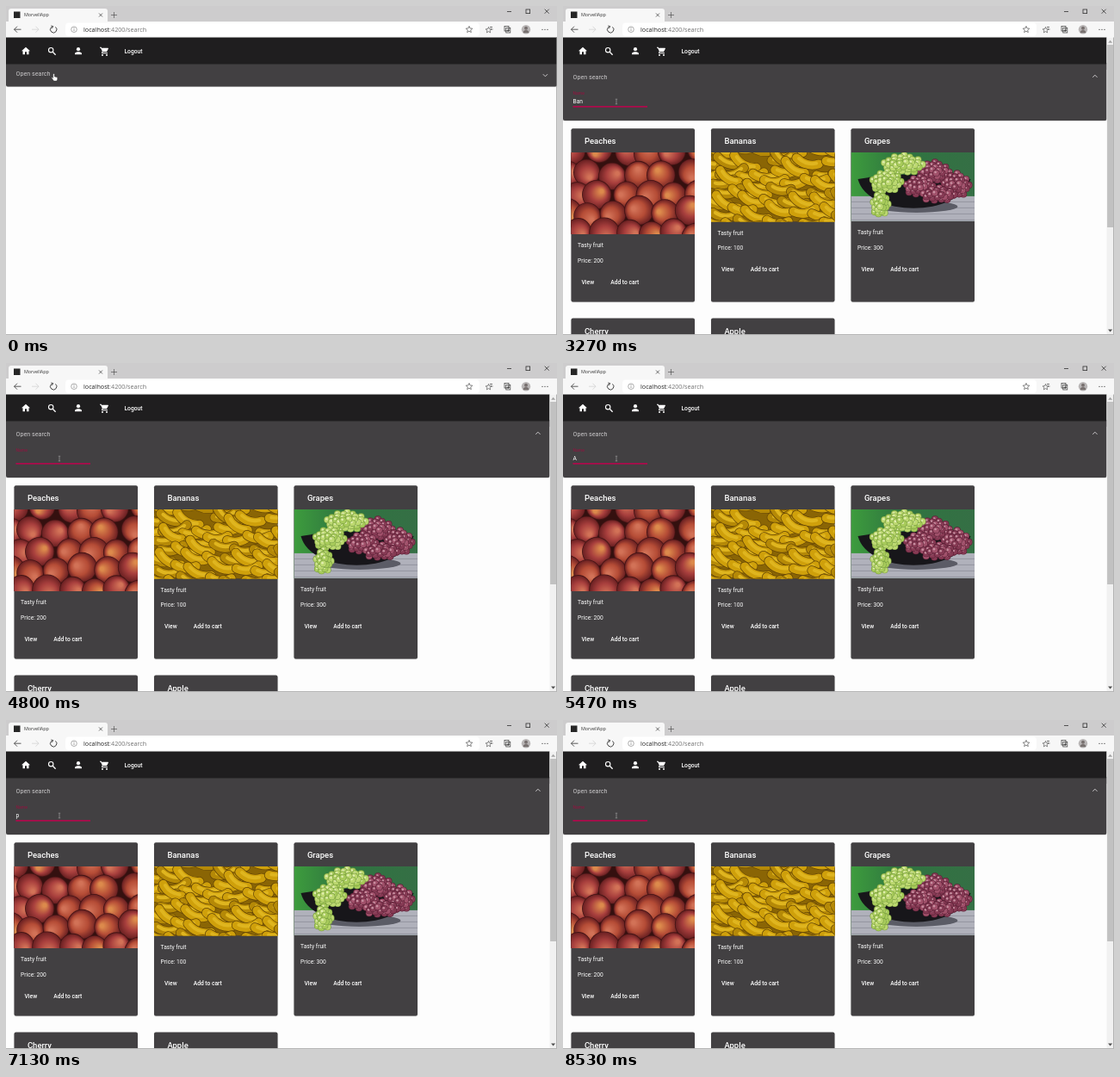
Write an HTML page with a canvas that moves like this. It is 640x382 px and loops after 8.59 s.

```html
<!DOCTYPE html>
<html lang="en">
<head>
<meta charset="utf-8">
<title>Fruit search</title>
<style>
  html, body { margin: 0; width: 100%; height: 100%; overflow: hidden; background: #fdfdfd; }
  canvas { display: block; width: 640px; height: 382px; }
</style>
</head>
<body>
<canvas id="stage"></canvas>
<script>
const W = 640, H = 382, LOOP = 8590, TICK = 66.6;
const PINK = '#b4004e', PANEL = '#424042', BAR = '#1f1e1f', WHITE = '#fff';
const UI = '"Open Sans", "Noto Sans", sans-serif';
const APP = 'Roboto, Arial, sans-serif';

const canvas = document.getElementById('stage');
const g = canvas.getContext('2d');
const dpr = window.devicePixelRatio || 1;
canvas.width = W * dpr;
canvas.height = H * dpr;

// Each entry holds from its time until the next one.
const typed = [[0, ''], [2600, 'B'], [2800, 'Ba'], [3000, 'Ban'], [4530, 'Ba'], [4600, 'B'],
  [4670, ''], [4930, 'A'], [6670, ''], [7000, 'p'], [8270, '']];
const views = [[0, 'none'], [1670, 'all'], [3790, 'spin'], [4270, 'Bananas'], [4670, 'all'],
  [5600, 'spin'], [6000, 'Apple'], [6670, 'all'], [7670, 'spin'], [8000, 'Peaches'], [8270, 'all']];
const OPEN = 400, MOVE = 670, ARRIVE = 1130, FOCUS = 1470;

const fruits = [
  { name: 'Peaches', price: 200, h: 95, photo: peaches },
  { name: 'Bananas', price: 100, h: 80.5, photo: bananas },
  { name: 'Grapes', price: 300, h: 80, photo: grapes },
  { name: 'Cherry', price: 200, h: 80, photo: apples },
  { name: 'Apple', price: 100, h: 72, photo: apples }
];

const at = (list, t) => list.filter(e => e[0] <= t).pop();
const clamp = x => Math.max(0, Math.min(1, x));
const mix = (a, b, k) => a + (b - a) * k;
const smooth = x => x * x * (3 - 2 * x);

function random(seed) {
  return () => (seed = (seed * 16807) % 2147483647) / 2147483647;
}

function rect(x, y, w, h, color) {
  g.fillStyle = color;
  g.fillRect(x, y, w, h);
}

function round(x, y, w, h, r, color) {
  g.fillStyle = color;
  g.beginPath();
  g.roundRect(x, y, w, h, r);
  g.fill();
}

function raised(x, y, w, h) {
  g.save();
  g.shadowColor = 'rgba(0,0,0,.25)';
  g.shadowBlur = dpr;
  g.shadowOffsetY = 0.4 * dpr;
  round(x, y, w, h, 2, PANEL);
  g.restore();
}

function oval(x, y, rx, ry, color) {
  g.fillStyle = color;
  g.beginPath();
  g.ellipse(x, y, rx, ry, 0, 0, 7);
  g.fill();
}

const dot = (x, y, r, color) => oval(x, y, r, r, color);

function line(points, color, width = 0.8) {
  g.strokeStyle = color;
  g.lineWidth = width;
  g.beginPath();
  points.forEach(([x, y], i) => i ? g.lineTo(x, y) : g.moveTo(x, y));
  g.stroke();
}

function ring(x, y, r, color, width = 0.8, from = 0, to = Math.PI * 2) {
  g.strokeStyle = color;
  g.lineWidth = width;
  g.beginPath();
  g.arc(x, y, r, from, to);
  g.stroke();
}

function text(s, x, y, size, color, weight = 400, family = APP) {
  g.font = `${weight} ${size}px ${family}`;
  g.fillStyle = color;
  g.fillText(s, x, y);
}

function path(d, x, y, scale, color) {
  g.save();
  g.translate(x, y);
  g.scale(scale, scale);
  g.fillStyle = color;
  g.fill(new Path2D(d));
  g.restore();
}

function star(x, y, r) {
  const pts = Array.from({ length: 11 }, (_, i) => {
    const a = i * Math.PI / 5 - Math.PI / 2, q = i % 2 ? r * 0.45 : r;
    return [x + q * Math.cos(a), y + q * Math.sin(a)];
  });
  line(pts, '#555', 0.7);
}

function browser() {
  const ink = '#333';
  rect(0, 0, W, 18, '#cdcccd');
  round(3, 3, 115, 18, [3, 3, 0, 0], '#f7f7f7');
  rect(0, 18, W, 18.5, '#f7f7f7');
  rect(9, 6.5, 7.5, 7.5, '#262626');
  text('MorvellApp', 21, 12.3, 5.4, ink, 400, UI);
  line([[108, 8.5], [112, 12.5]], ink, 0.7);
  line([[112, 8.5], [108, 12.5]], ink, 0.7);
  line([[122, 10.5], [129, 10.5]], '#555', 0.7);
  line([[125.5, 7], [125.5, 14]], '#555', 0.7);
  line([[582, 6.5], [587, 6.5]], ink);
  g.strokeRect(604, 4, 4.6, 4.6);
  line([[625.7, 3.7], [630.7, 8.7]], ink);
  line([[630.7, 3.7], [625.7, 8.7]], ink);

  line([[17.5, 27.2], [9.5, 27.2]], ink);
  line([[13, 23.7], [9.5, 27.2], [13, 30.7]], ink);
  line([[30, 27.2], [38, 27.2]], '#d3d3d3');
  line([[34.5, 23.7], [38, 27.2], [34.5, 30.7]], '#d3d3d3');
  ring(55.2, 27.3, 3.7, ink, 0.9, -0.9, 4.4);
  line([[52.3, 23], [54.8, 23.6], [53.4, 26]], ink);

  round(69, 19.5, 481, 15.5, 4, WHITE);
  ring(79, 27.2, 3.3, '#777', 0.6);
  line([[79, 26.7], [79, 29]], '#777', 0.7);
  dot(79, 25.4, 0.5, '#777');
  text('localhost', 90, 30, 7.2, '#222', 400, UI);
  const w = g.measureText('localhost').width;
  text(':4200/search', 90 + w, 30, 7.2, '#707070', 400, UI);

  star(538, 27.4, 4);
  star(560.5, 28, 3.6);
  line([[562, 24.5], [565, 24.5]], ink, 0.7);
  line([[563, 27], [565.5, 27]], ink, 0.7);
  g.strokeRect(579, 23.5, 5, 5.5);
  g.strokeRect(580.8, 25.5, 5, 5.5);
  line([[583.3, 26.6], [583.3, 30]], ink, 0.7);
  line([[581.6, 28.3], [585, 28.3]], ink, 0.7);
  dot(604, 27.3, 5.2, '#b9b6b6');
  dot(604, 25.8, 2, '#77706f');
  g.fillStyle = '#77706f';
  g.beginPath();
  g.arc(604, 31.3, 3.3, Math.PI, 0);
  g.fill();
  for (const x of [623, 626, 629]) dot(x, 27.3, 0.65, ink);
}

function navbar(width) {
  rect(0, 36, width, 31.5, BAR);
  path('M10 20v-6h4v6h5v-8h3L12 3 2 12h3v8z', 17, 46.3, 0.5, WHITE);
  ring(52.2, 51.2, 2.7, WHITE, 1.1);
  line([[54.2, 53.2], [57.6, 56.7]], WHITE, 1.3);
  dot(84, 50.2, 2.1, WHITE);
  path('M4 20v-2c0-2.7 5.3-4 8-4s8 1.300 8 4v2z', 78, 46.3, 0.5, WHITE);
  path('M1 2h3.300l.9 2H20l1 1-4 8H8l-1 2h12v2H6l-1-2 1.600-3.400L3 4H1z', 108.5, 46.8, 0.5, WHITE);
  dot(112, 57, 1, WHITE);
  dot(117, 57, 1, WHITE);
  text('Logout', 137.5, 54.7, 6.7, WHITE, 500);
}

function panel(t, width, word) {
  const open = t >= OPEN, bottom = open ? 133 : 93.5;
  rect(0, 66, width, 8, PANEL);
  raised(0, 66, width, bottom - 66);
  text('Open search', 11.5, open ? 85 : 81.4, 7.2, '#c9c7c9');
  const x = width - 13.6, y = open ? 81.5 : 80.5, d = open ? -1.3 : 1.3;
  line([[x - 2.6, y - d], [x, y + d], [x + 2.6, y - d]], '#c9c7c9', 1);
  if (!open) return;

  const k = smooth(clamp((t - FOCUS) / 200));
  const tone = k ? '#c4004f' : '#b5b3b5';
  text('Name', 11.5, mix(112.5, 103, k), mix(6.7, 5, k), k ? '#96103f' : tone);
  rect(11.5, 116.4, 86.5, 0.6, tone);
  rect(11.5 + 43.2 * (1 - k), 116.4, 86.5 * k, 1.2, tone);
  text(word, 11.5, 112.5, 6.7, WHITE);
}

function peaches(w, h) {
  const rnd = random(71);
  rect(0, 0, w, h, '#34100f');
  for (let row = 0; row < 5; row++) {
    for (let i = 0; i < 6; i++) {
      const x = i * 29 - (row % 2) * 14 + rnd() * 10, y = row * 24 + rnd() * 9 - 5;
      const r = 14 + rnd() * 3, a = rnd() * 6.3;
      const shade = g.createRadialGradient(x + 7 * Math.cos(a), y + 7 * Math.sin(a), 2, x, y, r);
      shade.addColorStop(0, rnd() < 0.5 ? '#dc8a4c' : '#d27257');
      shade.addColorStop(0.55, rnd() < 0.5 ? '#b54c36' : '#a83f3d');
      shade.addColorStop(1, '#6a2022');
      dot(x, y, r + 0.8, '#431414');
      dot(x, y, r, shade);
    }
  }
}

function bananas(w, h) {
  const rnd = random(29);
  rect(0, 0, w, h, '#8a6505');
  g.lineCap = 'round';
  for (let row = 0; row < 8; row++) {
    for (let i = 0; i < 8; i++) {
      const x = i * 22 + (row % 2) * 11 + rnd() * 8 - 6, y = row * 12 + rnd() * 6 - 26;
      const a = 0.7 + rnd() * 0.9, r = 22 + rnd() * 5, end = a + 1.15;
      ring(x, y, r, '#664705', 11.5, a, end);
      ring(x, y, r, rnd() < 0.6 ? '#cfa00b' : '#b58907', 10, a, end);
      ring(x, y, r - 1.5, '#dfb51f', 4, a + 0.1, end - 0.1);
    }
  }
  g.lineCap = 'butt';
}

function bunch(rnd, x, y, rx, ry, n, tones) {
  for (let i = 0; i < n; i++) {
    const a = i * 2.4, q = Math.sqrt((n - i) / n);
    const px = x + rx * q * Math.cos(a), py = y + ry * q * Math.sin(a);
    dot(px, py, 4.1, tones[0]);
    dot(px, py, 3.5, tones[1 + Math.floor(rnd() * 2)]);
    dot(px - 0.8, py - 0.9, 1.3, tones[3]);
  }
}

function grapes(w, h) {
  const rnd = random(13);
  const back = g.createLinearGradient(0, 0, w, 0);
  back.addColorStop(0, '#3d9c3d');
  back.addColorStop(0.4, '#2f7440');
  back.addColorStop(1, '#356f45');
  rect(0, 0, w, h, back);
  rect(0, 51, w, h - 51, '#b0b1bb');
  for (let i = 0; i < 4; i++) rect(0, 57 + i * 7, w, 1, '#9495a0');
  oval(76, 63, 48, 7, '#5b5c66');
  g.fillStyle = '#17161a';
  g.beginPath();
  g.moveTo(8, 31);
  g.bezierCurveTo(20, 76, 125, 76, 139, 31);
  g.quadraticCurveTo(75, 20, 8, 31);
  g.fill();
  const red = ['#5c2036', '#a0506a', '#863a54', '#c78fa0'];
  const green = ['#789e3f', '#bcd870', '#a8cb5b', '#e0edb0'];
  bunch(rnd, 96, 23, 18, 12, 30, red);
  bunch(rnd, 122, 38, 15, 14, 28, red);
  bunch(rnd, 79, 39, 16, 11, 25, red);
  bunch(rnd, 101, 49, 19, 8, 22, red);
  bunch(rnd, 60, 14, 23, 11, 34, green);
  bunch(rnd, 41, 34, 17, 12, 30, green);
  bunch(rnd, 34, 60, 9, 14, 20, green);
}

function apples(w, h) {
  const rnd = random(47);
  rect(0, 0, w, h, '#390914');
  for (let row = 0; row < 7; row++) {
    for (let i = 0; i < 11; i++) {
      const x = i * 15 - (row % 2) * 7 + rnd() * 5, y = row * 12 + rnd() * 5 - 1;
      const r = 7.2 + rnd() * 1.4;
      dot(x, y, r + 0.6, '#590d1d');
      dot(x, y, r, rnd() < 0.5 ? '#ab2038' : '#8e182f');
      dot(x - 1.5, y - 1.5, r * 0.55, '#c33b4c');
      dot(x - 2, y - 3, 1.1, '#f0c0b9');
      if (rnd() < 0.4) dot(x + 2, y + 1, 1.2, '#d6a060');
    }
  }
}

function card(fruit, x, y) {
  raised(x, y, 143.5, 201.2);
  text(fruit.name, x + 15.4, y + 18.1, 9.5, WHITE, 500);
  if (y > 300) return;
  g.save();
  g.translate(x, y + 27.6);
  g.beginPath();
  g.rect(0, 0, 143.5, fruit.h);
  g.clip();
  fruit.photo(143.5, fruit.h);
  g.restore();
  const base = y + 27.6 + fruit.h;
  text('Tasty fruit', x + 7.6, base + 15.2, 6.7, WHITE);
  text('Price: ' + fruit.price, x + 7.6, base + 32.7, 6.7, WHITE);
  text('View', x + 12, base + 58, 6.7, WHITE, 500);
  text('Add to cart', x + 45.7, base + 58, 6.7, WHITE, 500);
}

function scrollbar(x) {
  rect(x, 36.5, W - x, H - 36.5, '#f1f1f1');
  rect(x + 0.6, 45, 6.9, 212, '#c1c1c1');
  path('M0 3L2.500 0L5 3z', x + 1.6, 39.7, 1, '#a3a3a3');
  path('M0 0L2.500 3L5 0z', x + 1.6, 375.5, 1, '#505050');
}

// One second per cycle of the dash: half growing, half shrinking.
function spinner(s) {
  const turn = Math.floor(s), f = s % 1;
  const grow = f < 0.5, p = grow ? f * 2 : f * 2 - 1, q = 1 - p;
  const k = clamp(p < 0.5 ? 3.1 * p * p * (1 - p * 0.13) : 1 - 2.9 * q * q * q - 0.3 * q * q);
  const len = 360 * (grow ? mix(0.05, 0.8, k) : mix(0.8, 0.05, k));
  const from = turn * 270 + s * 180 - 90 + (grow ? 0 : 287.5 - len);
  const rad = Math.PI / 180;
  ring(24, 157, 21.5, PINK, 4.8, from * rad, (from + len) * rad);
}

function pointer(t) {
  const k = smooth(clamp((t - MOVE) / (ARRIVE - MOVE)));
  const x = mix(56, 62, k), y = mix(82, 111, k);
  if (y > 104) {
    line([[x, y - 2.6], [x, y + 2.6]], '#aaa', 0.6);
    line([[x - 1.2, y - 2.8], [x + 1.2, y - 2.8]], '#aaa', 0.6);
    line([[x - 1.2, y + 2.8], [x + 1.2, y + 2.8]], '#aaa', 0.6);
    return;
  }
  const hand = 'M2 0q1 0 1 1v3l4 1v3l-1 2H2L-1 6l1-1 1 1V1q0-1 1-1z';
  path(hand, x - 2.2, y - 3.5, 0.85, WHITE);
  g.save();
  g.translate(x - 2.2, y - 3.5);
  g.scale(0.85, 0.85);
  g.lineWidth = 0.5;
  g.strokeStyle = '#222';
  g.stroke(new Path2D(hand));
  g.restore();
}

function draw(t) {
  const [since, view] = at(views, t);
  const all = view === 'all';
  const width = all ? 631.5 : W;
  g.setTransform(dpr, 0, 0, dpr, 0, 0);
  rect(0, 0, W, H, '#fdfdfd');
  if (view === 'spin') spinner((t - since) / 1000);
  else fruits.filter(f => all || f.name === view).forEach((f, i) =>
    card(f, 9.5 + (i % 3) * 162.5, 142.3 + Math.floor(i / 3) * 220.2));
  panel(t, width, at(typed, t)[1]);
  navbar(width);
  if (all) scrollbar(width);
  browser();
  rect(639.3, 36.5, 0.7, H - 36.5, '#999');
  rect(0, 381, W, 1, '#b5b5b5');
  pointer(t);
}

const start = performance.now();
function frame() {
  const t = (performance.now() - start) % LOOP;
  draw(Math.floor((t + 5) / TICK) * TICK + 8);
  requestAnimationFrame(frame);
}
frame();
</script>
</body>
</html>
```
